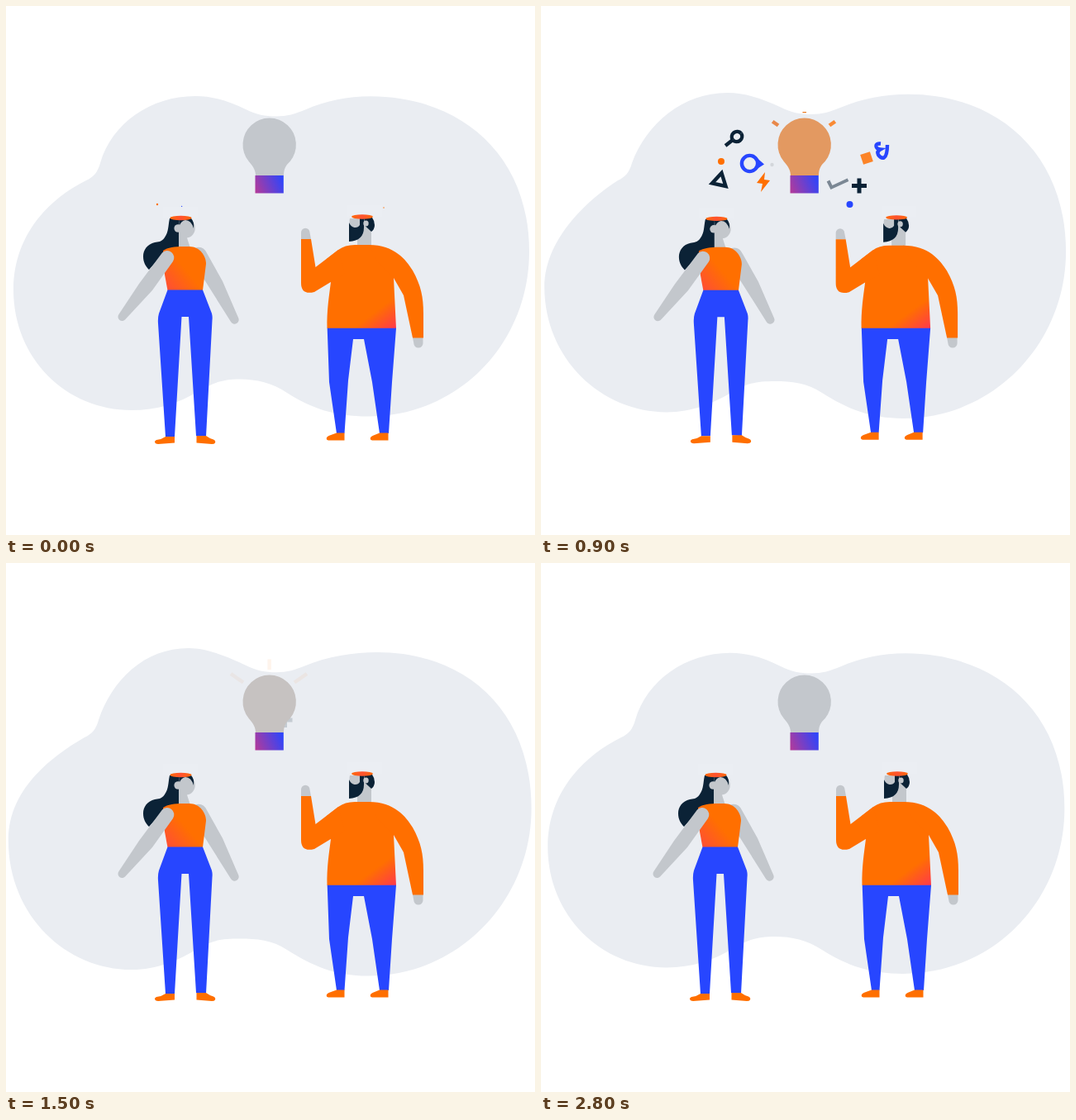
An HTML page for the animation above (3 s loop, 640 by 640 pixels).

```html
<!DOCTYPE html>
<html lang="en">
<head>
<meta charset="utf-8">
<title>Shared idea</title>
<style>
html, body { margin: 0; width: 100%; height: 100%; overflow: hidden; background: #fff; }
svg { display: block; width: 100vw; height: 100vh; }
.skin { fill: #c3c7cc; }
.hair { fill: #0b2236; }
.blue { fill: #2746ff; }
.orange { fill: #ff6f00; }
.mask { fill: #ebeef3; }
#icons path[stroke] { fill: none; stroke-width: 4.4; }
</style>
</head>
<body>
<svg viewBox="0 0 640 640">
  <defs>
    <linearGradient id="base" gradientUnits="userSpaceOnUse" x1="300" y1="222" x2="334" y2="208">
      <stop offset="0" stop-color="#b53a98"/><stop offset="1" stop-color="#2f45fa"/>
    </linearGradient>
    <linearGradient id="top" gradientUnits="userSpaceOnUse" x1="188" y1="342" x2="217" y2="318">
      <stop offset="0" stop-color="#ff4a3c"/><stop offset="1" stop-color="#ff6f00"/>
    </linearGradient>
    <linearGradient id="shirt" gradientUnits="userSpaceOnUse" x1="474" y1="393" x2="453" y2="365">
      <stop offset="0" stop-color="#ff3354"/><stop offset="1" stop-color="#ff6f00"/>
    </linearGradient>
    <linearGradient id="cut">
      <stop offset="0" stop-color="#ff6a0a"/><stop offset=".5" stop-color="#ff5230"/><stop offset="1" stop-color="#ff6a0a"/>
    </linearGradient>
  </defs>

  <path id="blob" fill="#eaedf2"/>
  <g id="icons"></g>

  <g id="rays" fill="none" stroke-width="4.5"></g>
  <path id="bulb" d="M302 205C302 197 297 192 293.7 188A32.2 32.2 0 1 1 343.7 188C338 193 336 198 336 205Z"/>
  <rect x="301.5" y="205" width="34.3" height="21.5" fill="url(#base)"/>

  <g id="woman">
    <rect class="mask" x="190" y="243" width="42" height="14"/>
    <path class="skin" d="M228 293Q238 289 243 299L262 333L281 377A5 5 0 0 1 272 382L238 328Z"/>
    <path class="hair" d="M198 257C196 266 197 273 192 280C188 286 184 285 180 286C171 288 166 295 166 303C166 310 169 315 173 319L190 300L209 292V257Z"/>
    <path class="skin" d="M209 262Q211 257 217 257A10.5 11.5 0 0 1 219 280.5L223 293H209Z"/>
    <path class="hair" d="M209 257H224Q228 261 227 269Q224 259 217 259Q212 260 209.5 266Z"/>
    <circle class="skin" cx="208.2" cy="269" r="4.8"/>
    <path d="M190 296C195 292 205 291 214 291H222C234 291 242 302 242 312L238 344H195.5L192 325Z" fill="url(#top)"/>
    <path class="skin" d="M189 298.5A8.4 8.4 0 0 1 202 309L177 344L144.5 379A5 5 0 0 1 136.5 373L161 336Z"/>
    <path class="blue" d="M195.5 343.5H238L249 372Q250 376 249.5 380L242 521L230 520L221 376H212.5L204 521H193L184 384Q183.5 377 185 372Z"/>
    <path class="orange" d="M204 521H193Q188 524.5 182 525Q179.5 526 180 528Q181 530 184 530L204 528.5ZM230.5 520H242Q246 523 251 524.5Q254 526 253 528.5Q252 530 249 530L230.5 528.5Z"/>
    <ellipse cx="211.5" cy="256.5" rx="13" ry="2.7" fill="url(#cut)"/>
  </g>

  <g id="man">
    <rect class="mask" x="413" y="241" width="42" height="14"/>
    <path class="skin" d="M425 256H434L442 270V292H425Z"/>
    <path class="skin" d="M416 257H430V268H420Q415 265 415.5 260Z"/>
    <path class="hair" d="M415 262V285Q433 284 433 268V256H428V265Q426 268.5 421.5 268Q417 267 415 262Z"/>
    <path class="hair" d="M433 256H443Q446 260 446 265Q446 270 442 273L434.5 266Z"/>
    <ellipse class="skin" cx="435.5" cy="263" rx="3.2" ry="3.6"/>
    <path class="skin" d="M492 401H504.5V408A5.6 5.6 0 0 1 493.3 408Z"/>
    <path d="M388.5 390C388 368 391 350 393 334L388 306L402 295Q410 289 422 289H440L470 310L469 329L472 390Z" fill="url(#shirt)"/>
    <path class="orange" d="M439 289C470 289 484 307 492 320C502 338 505 352 505 372V401.5H492L481 350L469 329L450 310Z"/>
    <path class="blue" d="M388.7 389.7H472L467 455L463 517H452L443 455L433 403H420L414 453L409.5 517H400L391 455Z"/>
    <path class="orange" d="M400 516.5H409.5V525.5H390Q387 525 388 522Q389 520.5 391 519.8ZM452 516.5H462.5V525.5H443Q440 525 441 522Q442 520.5 444 519.8Z"/>
    <ellipse cx="431" cy="255" rx="12.8" ry="2.7" fill="url(#cut)"/>
  </g>
  <g id="arm">
    <path class="skin" d="M357 282V274A5.2 5.2 0 0 1 367.5 274L369 282Z"/>
    <path class="orange" d="M357 282H369L374.5 316L402 295L410 325L392 334.5L373 346Q357 350 357 335Z"/>
  </g>
</svg>

<script>
const LOOP = 3000, STEP = 100, LAST = 2800;
const DARK = '#0b2236', BLUE = '#2746ff', ORANGE = '#ff6f00', GRAY = '#c3c7cc';
const $ = id => document.getElementById(id);
const clamp = v => Math.max(0, Math.min(1, v));
const ramp = (t, a, b) => clamp((t - a) / (b - a));

function make(parent, tag, attrs = {}) {
  const el = document.createElementNS(parent.namespaceURI, tag);
  for (const k in attrs) el.setAttribute(k, attrs[k]);
  return parent.appendChild(el);
}

// The blob breathes on three overlapping waves: spread, lift and a flatter shoulder
function blobPath(t) {
  const spread = t < 1300 ? t / 1300 : (LOOP - t) / 1700;
  const lift = Math.sin(Math.PI * t / LOOP) ** 2, lean = 8 * lift * lift;
  const flat = Math.sin(Math.PI * ramp(t, 0, 1800));
  const left = 9 - 7 * spread, right = 633 + 3 * spread, midY = 343 - lean;
  const ax = 229 - lean, ay = 109 - 6 * lift;
  const bx = 441 + lean, by = 109.3 - 2.6 * flat;
  const dip = 133.5 - 2.5 * flat;
  const low = 3.5 * spread, k = 4 * flat;
  return `M${left} ${midY}C${left} ${midY - 60 + 3 * k} ${45 - k} ${237 + 2 * k} ${97 - k} 211
    C${106 - k} 207 ${111 - k} 201 ${114 - k} 190C128 142 ${ax - 54} ${ay} ${ax} ${ay}
    C${ax + 24} ${ay} 272 ${dip - 17} 290 ${dip - 8.5}C303 ${dip - 2} 313 ${dip} 327 ${dip}
    C340 ${dip} 350 ${dip - 3} 362 ${dip - 8}C388 ${dip - 19} ${bx - 28} ${by} ${bx} ${by}
    C${bx + 107} ${by} ${right} 178 ${right} 297C${right} 408 548 ${496.5 + low} 438 ${496.5 + low}
    C398 ${496.5 + low} 370 487 340 468C322 456 303 ${451.5 + low} 283 ${451.5 + low}
    C262 ${451.5 + low} 250 456 233 466
    C208 481 183 ${489 + low} 152 ${489 + low}C73 ${489 + low} ${left} 427 ${left} ${midY}Z`;
}

// Each icon leaves a head, passes `via` at 600 ms and settles upright at `to` at 900 ms
const VIA = 600, SET = 900;
const icons = [];
function icon(color, { fill, lines = [] }, from, via, to, { spin = 0, born = -120, gone = 1200 } = {}) {
  const g = make($('icons'), 'g');
  if (fill) make(g, 'path', { d: fill, fill: color });
  const strokes = lines.map(d => make(g, 'path', { d, stroke: color, pathLength: 1 }));
  icons.push({ g, strokes, from, via, to, spin, born, gone });
}

// Parabola through the three points
function along({ from, via, to }, t) {
  return from.map((p, i) => {
    const v1 = (via[i] - p) / VIA, v2 = (to[i] - p) / SET;
    return p + t * (v1 + (v2 - v1) * (t - VIA) / (SET - VIA));
  });
}

function drawIcon(it, t) {
  const size = ramp(t, it.born, it.born + 400);
  const alpha = 1 - ramp(t, it.gone - 300, it.gone);
  it.g.setAttribute('display', size * alpha > 0 ? 'inline' : 'none');
  const [x, y] = along(it, t);
  it.g.setAttribute('transform', `translate(${x} ${y}) rotate(${it.spin * (t - SET)}) scale(${size})`);
  it.g.setAttribute('opacity', alpha);
  const shown = ramp(t, 0, 850);
  for (const s of it.strokes) s.setAttribute('stroke-dasharray', shown < 1 ? `${shown} 2` : 'none');
}

const dot = r => ({ fill: `M${-r} 0a${r} ${r} 0 1 0 ${2 * r} 0a${r} ${r} 0 1 0 ${-2 * r} 0Z` });
const magnifier = { lines: ['M-13.9 11L-5.1 4', 'M-5.1 4A6.5 6.5 0 0 1 5.1 -4', 'M-5.1 4A6.5 6.5 0 0 0 5.1 -4'] };
const bubble = { fill: 'M9 -6.5L17.5 1L9 6.5Z', lines: ['M9.6 0A9.6 9.6 0 0 0 -9.6 0A9.6 9.6 0 0 0 9.6 0'] };
const bolt = { fill: 'M2 -12L-8 1L-1 2L-3 12L8 -2L1 -3Z' };
const triangle = { lines: ['M2.2 -9.5L-9.3 3L7.2 6.5Z'] };
const plus = { fill: 'M-9 -2.5H-2.5V-9H2.5V-2.5H9V2.5H2.5V9H-2.5V2.5H-9Z' };
const check = { fill: 'M-5.8 -7.1L-2.2 -8.9L.9 -2.6L19.2 -11.1L20.8 -7.5L-1 2.6Z' };
const square = { fill: 'M-7.8 -3.9L3.9 -7.8L7.8 3.9L-3.9 7.8Z' };
const curl = { lines: ['M-1 -8.5Q-7 -9 -6.5 -5Q-6 -2 -1.5 -1.5Q-6 1 -4 5Q-1 9.5 3 8.5Q7 6 7 -7'] };

icon(DARK, magnifier, [207, 203], [222, 170.5], [237, 158], { spin: -.045 });
icon(ORANGE, dot(4), [183, 240], [202, 197.5], [218, 188]);
icon(BLUE, bubble, [216, 242], [242, 201.5], [252.5, 190.5], { spin: .23, gone: 1400 });
icon(ORANGE, bolt, [233, 263], [261.5, 229], [269, 213], { spin: .1, born: 60 });
icon(GRAY, dot(2.2), [237, 247], [273, 212], [279.5, 192], { born: 20, gone: 1080 });
icon(DARK, triangle, [181, 261], [195, 225], [216.3, 211.5], { spin: -.068 });
icon(DARK, plus, [440, 245], [405.5, 228.5], [385, 217.5], { spin: -.15, born: 220, gone: 1550 });
icon(DARK, check, [404, 244], [359, 234], [351.5, 219.5], { spin: -.13, born: 70, gone: 1050 });
icon(BLUE, dot(4), [428, 256], [394.5, 250], [373.5, 240], { born: 310 });
icon(ORANGE, square, [438, 245], [414.8, 199], [394, 184], { spin: -.18, born: 180, gone: 1150 });
icon(ORANGE, dot(2.3), [457, 244], [403, 182.5], [370, 168], { gone: 850 });
icon(BLUE, curl, [462, 246], [436.5, 192.5], [412, 175], { spin: .13, born: 60 });

// Rays grow away from the bulb: inner end, direction, start time
function ray(stroke, x, y, dx, dy, start) {
  return { el: make($('rays'), 'path', { stroke }), x, y, dx, dy, start };
}
const rays = [
  ray('#e8884a', 287, 144.5, -15, -10.5, 800),
  ray('#e87010', 318.7, 129.2, 0, -12.7, 880),
  ray('#f98a35', 349, 144.5, 15, -10.5, 800)
];

const mix = (a, b, u) => `rgb(${a.map((v, i) => Math.round(v + (b[i] - v) * u))})`;

function draw(t) {
  $('blob').setAttribute('d', blobPath(t));
  icons.forEach(it => drawIcon(it, t));

  const glow = ramp(t, 700, 1080) * (1 - ramp(t, 1160, 1520));
  $('bulb').setAttribute('fill', mix([195, 199, 204], [255, 111, 0], glow));
  for (const { el, x, y, dx, dy, start } of rays) {
    const u = ramp(t, start, start + 220);
    el.setAttribute('d', `M${x} ${y}l${dx * u} ${dy * u}`);
    el.setAttribute('opacity', u ? 1 - ramp(t, 1260, 1520) : 0);
  }

  // Both people sink a little and lean towards each other
  const sway = Math.sin(Math.PI * ramp(t, 0, 1300)) ** 2, sink = .009 * sway;
  const pose = (id, dx, s) =>
    $(id).setAttribute('transform', `translate(${dx * sway} ${405 * s}) scale(1 ${1 - s})`);
  pose('woman', 1.3, sink);
  pose('man', -1.3, sink);
  pose('arm', -.5, sink / 2);
}

let start;
function tick(now) {
  start ??= now;
  const t = (now - start) % LOOP;
  draw(Math.min(LAST, Math.floor(t / STEP) * STEP));
  requestAnimationFrame(tick);
}
draw(0);
requestAnimationFrame(tick);
</script>
</body>
</html>
```
